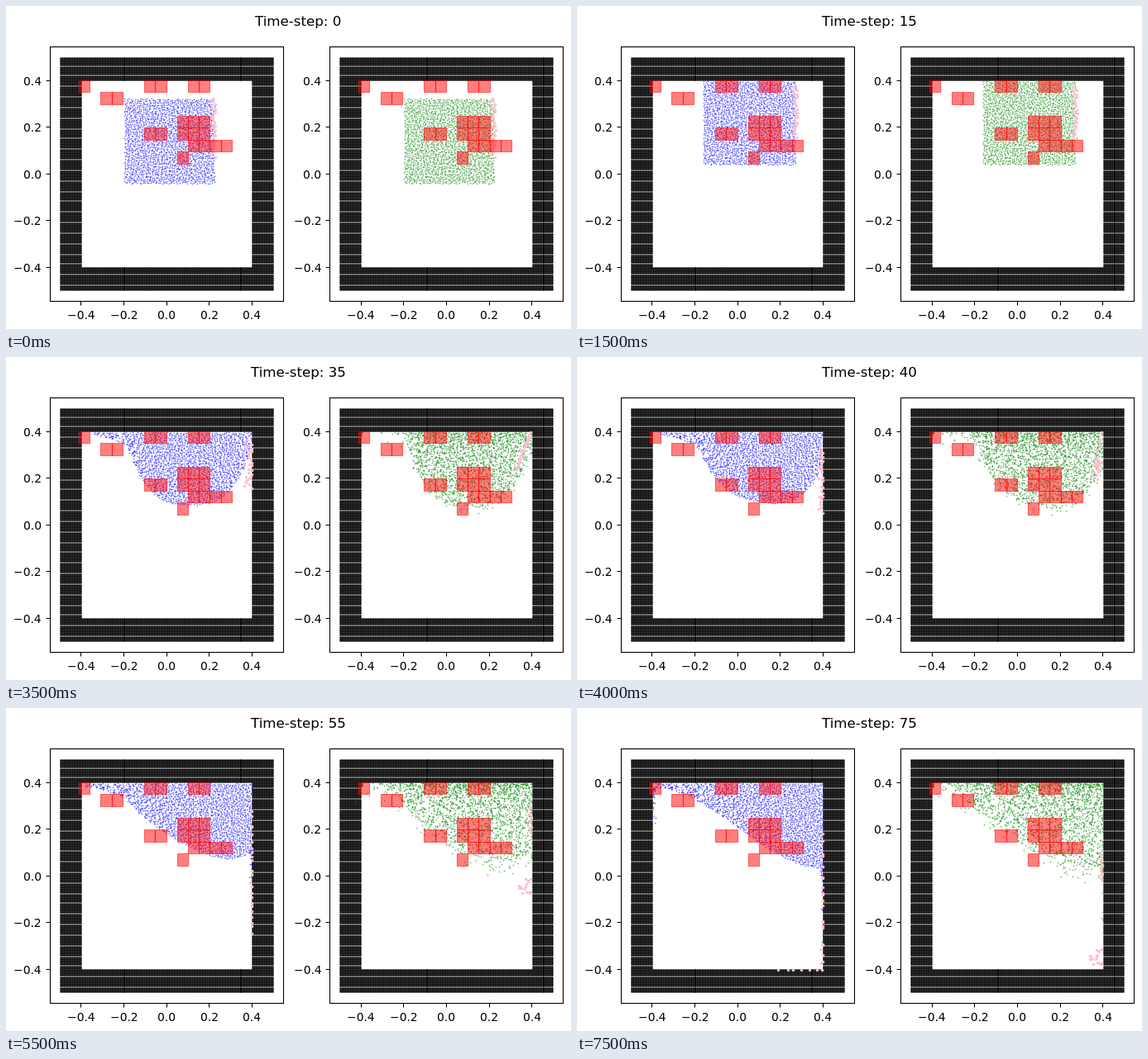
An HTML page with a canvas for the animation above (8 s loop, 683 by 391 pixels).

```html
<!DOCTYPE html>
<html>
<head>
<meta charset="utf-8">
<style>
  html, body { margin: 0; width: 100%; height: 100%; overflow: hidden; background: #fff; }
  canvas, svg { position: absolute; left: 0; top: 0; }
  text { font-family: "DejaVu Sans", sans-serif; font-size: 13.89px; }
  #title { font-size: 16.67px; }
</style>
</head>
<body>
<canvas id="stage" width="683" height="391"></canvas>
<svg id="plot" width="683" height="391" viewBox="0 0 683 391">
  <text id="title" y="24"></text>
</svg>
<script>
const STEP_MS = 500, STEPS = 16, SHIFT = 338.2;
const LEFT = 92, RIGHT = 297, CEILING = 91, FLOOR = 317;
const ctx = document.getElementById('stage').getContext('2d');
const svg = document.getElementById('plot');
const title = document.getElementById('title');
const lerp = (a, b, k) => a + (b - a) * k;
const clamp = k => Math.min(1, Math.max(0, k));
const span = (t, from, to) => clamp((t - from) / (to - from));
const smooth = k => k * k * (3 - 2 * k);

function seeded(seed) {
  return () => {
    seed = (seed + 0x6D2B79F5) | 0;
    let n = Math.imul(seed ^ seed >>> 15, 1 | seed);
    n ^= n + Math.imul(n ^ n >>> 7, 61 | n);
    return ((n ^ n >>> 14) >>> 0) / 4294967296;
  };
}

// Axes, labels and red cells
function add(name, attrs) {
  const el = document.createElementNS('http://www.w3.org/2000/svg', name);
  for (const key in attrs) el.setAttribute(key, attrs[key]);
  return svg.appendChild(el);
}
// Places text on whole pixels; align is 0.5 for centre and 1 for right
function setText(el, text, x, align) {
  el.textContent = text;
  el.setAttribute('x', Math.round(x - el.getComputedTextLength() * align));
}
function addCell(col, row, ox) {
  const edgeX = n => Math.round(88 + 13.2 * n + ox), edgeY = n => Math.round(90 + 14.37 * n);
  const x = edgeX(col), y = edgeY(row);
  add('rect', { x: x + .5, y: y + .5, width: edgeX(col + 1) - x, height: edgeY(row + 1) - y,
    fill: 'red', stroke: 'red', 'stroke-width': 1.2, 'stroke-linejoin': 'round',
    'fill-opacity': .5, 'stroke-opacity': .5 });
}
// Runs of cells: column, row, columns wide, rows high
const RUNS = [[0, 0, 1, 1], [2, 1, 2, 1], [6, 0, 2, 1], [10, 0, 2, 1],
  [6, 4, 2, 1], [9, 3, 3, 2], [10, 5, 4, 1], [9, 6, 1, 1]];

for (const ox of [0, SHIFT]) {
  for (const [col, row, wide, high] of RUNS) {
    for (let n = 0; n < wide * high; n++) addCell(col + n % wide, row + Math.floor(n / wide), ox);
  }
  const frameX = Math.round(53 + ox) + .5;
  add('rect', { x: frameX, y: 49.5, width: 282, height: 308, fill: 'none', stroke: '#000', 'stroke-width': 1.1 });
  for (let i = -2; i <= 2; i++) {
    const label = (i < 0 ? '\u2212' : '') + (Math.abs(i) / 5).toFixed(1);
    const x = 194.2 + 51.6 * i + ox, y = 203.4 - 56.45 * i;
    const tickX = Math.floor(x) + .5, tickY = Math.floor(y) + .5;
    add('path', { d: `M${tickX} 357.5v5M${frameX} ${tickY}h-5`, stroke: '#000', 'stroke-width': 1.1 });
    setText(add('text', { y: 379 }), label, x, .5);
    setText(add('text', { y: Math.round(y + 5.3) }), label, 43.1 + ox, 1);
  }
}

// Boundary particles: a square grid with its middle left open
const GRID = 130, WALL = 13;
const inner = n => n >= WALL && n < GRID - WALL;
const walls = document.createElement('canvas');
walls.width = 683;
walls.height = 391;
const wallCtx = walls.getContext('2d');
for (const ox of [0, SHIFT]) {
  for (let j = 0; j < GRID; j++) {
    for (let i = 0; i < GRID; i++) {
      if (inner(i) && inner(j)) continue;
      const x = Math.round(66.035 + 1.986 * i + ox), y = Math.round(62.8 + 2.1715 * j);
      wallCtx.beginPath();
      wallCtx.arc(x + .5, y + .5, 1.2, 0, 7);
      wallCtx.fill();
    }
  }
}

// Depth of the fluid below the ceiling: a bowl that settles into a slope
function poolDepth(x, t, { tail, bend }) {
  const bowl = 88 * (1 - Math.min(1, Math.abs(x - 222) / 82) ** 3);
  const film = tail * span(x, 97, 140);
  const slope = 5 + 98 * smooth(span(x, LEFT, RIGHT) ** bend);
  const settle = 1 - (1 - span(t, 3500, 7500)) ** 2;
  return lerp(Math.max(bowl, film), slope, settle);
}

// Maps the unit square onto the fluid with even density
function outline(t, shape) {
  const rise = span(t, 0, 1500), spread = span(t, 1500, 3500);
  const top = Math.max(CEILING, 112 - t * .0165);
  const x0 = lerp(143, 152.5, rise), x1 = lerp(252, 264, rise), bottom = lerp(215, 192, rise);
  const xs = [], hs = [], sums = [0], parts = 30;
  for (let n = 0; n <= parts; n++) {
    const poolX = lerp(LEFT, RIGHT, n / parts);
    xs.push(lerp(lerp(x0, x1, n / parts), poolX, spread));
    hs.push(Math.max(.01, lerp(bottom - top, poolDepth(poolX, t, shape), spread)));
    if (n) sums.push(sums[n - 1] + (xs[n] - xs[n - 1]) * (hs[n] + hs[n - 1]) / 2);
  }
  return (u, v) => {
    const goal = u * sums[parts];
    let n = 0;
    while (n < parts - 1 && sums[n + 1] < goal) n++;
    const w = xs[n + 1] - xs[n], area = goal - sums[n], slant = hs[n + 1] - hs[n];
    const dx = 2 * area / (hs[n] + Math.sqrt(Math.max(0, hs[n] ** 2 + 2 * slant * area / w)));
    return [xs[n] + dx, top + v * (hs[n] + slant * dx / w)];
  };
}

const rand = seeded(7), SIDE = 46;
const fluid = Array.from({ length: SIDE * SIDE }, (_, i) => ({
  u: (i % SIDE + .5 + (rand() - .5) * .9) / SIDE,
  v: (Math.floor(i / SIDE) + .5 + (rand() - .5) * .9) / SIDE,
  du: rand() - .5, dv: rand() - .5, stray: rand()
}));
const drips = Array.from({ length: 36 }, () => ({ depth: rand() ** 1.5, inset: rand() ** 2 * 3 }));
const markers = Array.from({ length: 30 }, (_, i) => ({ s: (i + .5) / 30, jx: rand() - .5, jy: rand() - .5 }));

function dot(x, y) {
  x = Math.round(x);
  y = Math.round(y);
  ctx.globalAlpha = .18;
  ctx.fillRect(x - 1, y, 3, 1);
  ctx.fillRect(x, y - 1, 1, 3);
  ctx.globalAlpha = .34;
  ctx.fillRect(x, y, 1, 1);
}
function star(x, y) {
  ctx.beginPath();
  ctx.arc(Math.round(x) + .5, Math.round(y) + .5, 1.75, 0, 7);
  ctx.fill();
}

function drawBlue(t) {
  const place = outline(t, { tail: 12, bend: 1 });
  ctx.fillStyle = 'blue';
  for (const p of fluid) dot(...place(p.u, p.v));
  const right = Math.max(0, t - 4500), left = Math.max(0, t - 5500);
  if (right) for (const d of drips) dot(RIGHT - d.inset, 162 + right * (.01 + d.depth * .04));
  if (left) for (const d of drips.slice(12)) dot(LEFT + d.inset, 96 + left * d.depth * .022);
}

function drawGreen(t) {
  const place = outline(t, { tail: 3, bend: .8 });
  const mix = span(t, 1500, 5500);
  ctx.fillStyle = 'green';
  for (const p of fluid) {
    const u = clamp(p.u + p.du * mix * .08), v = Math.abs(p.v + p.dv * mix * .08);
    const [x, y] = place(u, v ** (1 + mix * .4));
    const loose = mix * p.stray ** 5 * v;
    dot(Math.min(RIGHT, x + loose * p.du * 24) + SHIFT, y + loose * 24);
  }
  const fall = Math.max(0, t - 5500);
  if (fall) for (const d of drips.slice(0, 12)) dot(RIGHT - d.inset + SHIFT, 185 + d.depth * fall * .045);
}

function drawPink(t) {
  ctx.globalAlpha = 1;
  ctx.fillStyle = 'pink';
  const rise = span(t, 0, 1500), drift = span(t, 1500, 3500);
  const settled = span(t, 3500, 4500), fall = span(t, 3500, 7500);
  const bandX = 250.5 + 13 * rise + 29.5 * drift + 4 * settled;
  const top = 112 - 17 * rise + 5 * drift + 53 * fall;
  const end = 183 - 24 * rise + 240 * fall * (1 - .12 * fall);
  const wallTop = 112 - 17 * rise - 3 * drift + 115 * Math.max(0, fall - .25);
  const wallEnd = 183 - 23 * rise - 24 * drift + 76 * fall * fall;
  const clump = 130 + 171 * fall;

  markers.forEach((m, i) => {
    // Down the wall, then along the floor
    const along = lerp(top, end, clamp(m.s + m.jy * .06 * settled)) + m.jy * 3;
    const spread = m.jx * lerp(lerp(6, 11, drift), 1, settled);
    star(Math.min(RIGHT, bandX + spread) - Math.max(0, along - FLOOR), Math.min(FLOOR, along));

    // Some stay on the wall, the others drop together
    const curve = 17 * m.s * (1 - settled) + Math.abs(m.jx) * 5;
    const x = lerp(bandX + m.jx * 6, RIGHT - curve, drift), y = lerp(wallTop, wallEnd, m.s) + m.jy * 3;
    const drop = i % 5 > 1 ? settled : 0;
    star(lerp(x, 289 + m.jx * 16, drop) + SHIFT, lerp(y, clump + m.jy * 20, drop));
  });
}

let shown = -1;
function render(now) {
  const step = Math.floor(now / STEP_MS) % STEPS;
  if (step === shown) return;
  shown = step;
  const t = step * STEP_MS;
  setText(title, 'Time-step: ' + step * 5, 353, .5);
  ctx.globalAlpha = 1;
  ctx.clearRect(0, 0, 683, 391);
  ctx.drawImage(walls, 0, 0);
  drawBlue(t);
  drawGreen(t);
  drawPink(t);
}
const begin = performance.now();
function tick() {
  render(performance.now() - begin);
  requestAnimationFrame(tick);
}
tick();
</script>
</body>
</html>
```
